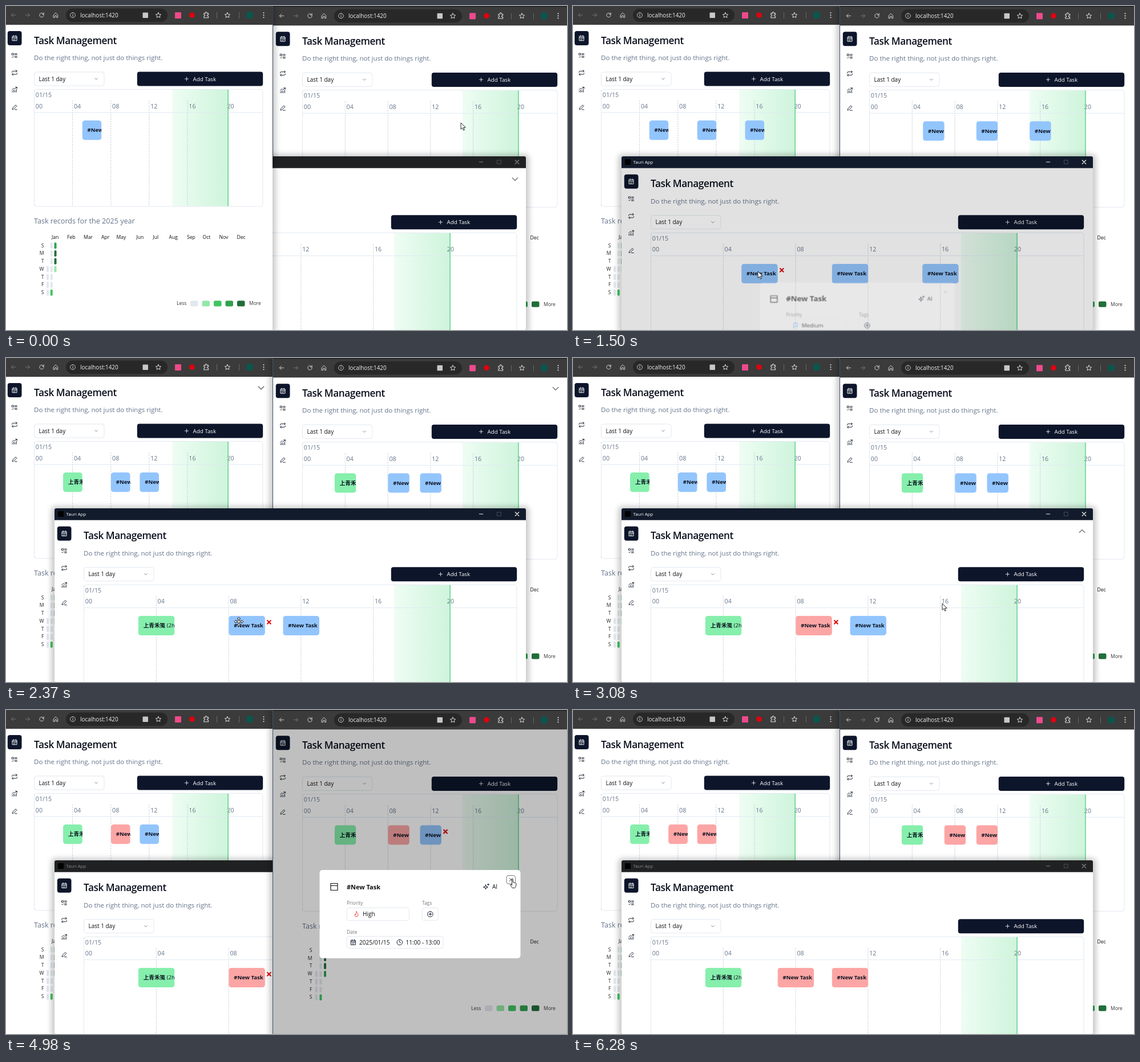
These frames come from a looping animation (983x569 px, 6300 ms). An HTML page:

```html
<!DOCTYPE html>
<html lang="en">
<head>
<meta charset="utf-8">
<title>Task Management</title>
<style>
html, body { margin: 0; width: 100%; height: 100%; overflow: hidden; background: #fff; }
#stage { display: block; width: 100vw; height: 100vh; font-family: "Open Sans", "Noto Sans", "Noto Sans CJK SC", "Noto Sans CJK", sans-serif; }
text { white-space: pre; }
.shadow { filter: blur(5px); }
</style>
</head>
<body>
<svg id="stage" viewBox="0 0 983 569" preserveAspectRatio="none">
  <defs>
    <linearGradient id="past">
      <stop offset="0" stop-color="#86efac" stop-opacity=".14"/>
      <stop offset=".45" stop-color="#86e8a8" stop-opacity=".26"/>
      <stop offset="1" stop-color="#86e3a6" stop-opacity=".4"/>
    </linearGradient>
  </defs>
</svg>
<script>
const LOOP = 6300;
const INK = '#0c152a', MUTED = '#64748b', BORDER = '#e2e8f0';
const stage = document.getElementById('stage');

const ICONS = {
  back: 'M20 12H4M11 5l-7 7 7 7',
  forward: 'M4 12h16M13 5l7 7-7 7',
  reload: 'M20 12a8 8 0 1 1-2.4-5.7L20 9M20 3v6h-6',
  home: 'M4 11l8-8 8 8v10h-5v-7H9v7H4z',
  info: 'M12 2a10 10 0 1 1 0 20a10 10 0 1 1 0-20M12 11v6M12 7v1',
  star: 'M12 3l2.8 6 6.5.8-4.8 4.4 1.3 6.4L12 17.4l-5.8 3.2 1.3-6.4L2.7 9.8l6.5-.8z',
  puzzle: 'M4 6h5V4a2 2 0 0 1 5 0v2h5v5h-2a2 2 0 0 0 0 5h2v5H4v-5h1a2 2 0 0 0 0-5H4z',
  calendar: 'M4 5h16v16H4zM4 10h16M8 2v4M16 2v4M8 14h1M12 14h1M16 14h1M8 18h1M12 18h1',
  list: 'M3 4h6v6H3zM13 5h8M13 9h8M3 17l2 2 4-4M13 15h8M13 19h8',
  repeat: 'M17 2l4 4-4 4M3 11V9a3 3 0 0 1 3-3h15M7 22l-4-4 4-4M21 13v2a3 3 0 0 1-3 3H3',
  chart: 'M4 20v-5M9 20v-8M14 20v-6M19 20V10M3 11l6-6 4 4 8-7M15 2h6v5',
  pen: 'M4 20l1-5L16 4l4 4L9 19zM13 21h8',
  down: 'M6 9l6 6 6-6',
  up: 'M6 15l6-6 6 6',
  plus: 'M12 4v16M4 12h16',
  cross: 'M6 6l12 12M18 6L6 18',
  minus: 'M5 12h14',
  box: 'M5 5h14v14H5z',
  panel: 'M3 3h18v18H3zM3 9h18',
  spark: 'M10 6l2 6 6 2-6 2-2 6-2-6-6-2 6-2zM19 2v6M16 5h6',
  addRound: 'M12 2a10 10 0 1 1 0 20a10 10 0 1 1 0-20M12 7v10M7 12h10',
  clock: 'M12 2a10 10 0 1 1 0 20a10 10 0 1 1 0-20M12 6v6l4 2',
  flame: 'M12 2c1 5 6 7 6 13a6 6 0 0 1-12 0c0-2 1-3 2-4 0 2 1 3 2 3 2-2 0-6 2-12',
  flag: 'M5 22V3h14v15l-7-4-7 4'
};

const icon = (name, x, y, size, color = INK, weight = 2) =>
  `<path d="${ICONS[name]}" transform="translate(${x - size / 2} ${y - size / 2}) scale(${size / 24})" fill="none" stroke="${color}" stroke-width="${weight}" stroke-linecap="round" stroke-linejoin="round"/>`;
const rect = (x, y, w, h, fill, r = 0, more = '') =>
  `<rect x="${x}" y="${y}" width="${w}" height="${h}" rx="${r}" fill="${fill}" ${more}/>`;
const frame = (x, y, w, h, r = 4, fill = 'none') => rect(x, y, w, h, fill, r, `stroke="${BORDER}"`);
const text = (s, x, y, size, color = '#111', weight = 400, more = '') =>
  `<text x="${x}" y="${y}" font-size="${size}" fill="${color}" font-weight="${weight}" ${more}>${s}</text>`;
const line = (x1, y1, x2, y2, color, more = '') =>
  `<path d="M${x1} ${y1}L${x2} ${y2}" stroke="${color}" fill="none" ${more}/>`;
const dot = (x, y, r, fill) => `<circle cx="${x}" cy="${y}" r="${r}" fill="${fill}"/>`;

// Each page shares one layout; "extra" is the added content width.
const WINS = {
  L: { x: 0, y: 0, w: 467, h: 569, dx: 0, dy: 0, extra: 0, zoom: 1, modal: [233, 357] },
  R: { x: 467.5, y: 0, w: 515.5, h: 569, dx: 470, dy: 1.3, extra: 46, zoom: 1.13, modal: [725.5, 358.5] },
  T: { x: 85, y: 264, w: 826, h: 305, dx: 87, dy: 251.7, extra: 358, zoom: 1, modal: [498, 561] }
};
const hourWidth = win => (402.8 + win.extra) / 24;

function browserBar(win) {
  const e = win.extra, c = '#dedede', dim = '#7b7b7b';
  return rect(-3, -2, 480 + e, 35, '#3b3b3b') + (e ? rect(-3, -2, 480 + e, 2, '#1d1d1d') : '') +
    icon('back', 13, 16, 11, e ? c : dim) + icon('forward', 38, 16, 11, dim) +
    icon('reload', 62.5, 16, 11, c) + icon('home', 87, 16, 11, c) +
    rect(105, 4.5, 178 + e, 23.5, '#282828', 11.7) +
    icon('info', 117, 16, 10.5, c) + text('localhost:1420', 130, 19.8, 9.9, '#f0f0f0') +
    `<g transform="translate(${e} 0)">` +
    rect(239.5, 11.5, 9.5, 9.5, '#c8c8c8', 1) + icon('star', 267, 16, 12, c) +
    rect(296, 11, 11, 11, '#ee4a8b', 1) + dot(326, 16, 4.8, '#e2000f') +
    icon('puzzle', 351, 16, 12.5, c) + line(369.5, 11, 369.5, 22, '#666') +
    icon('star', 388, 16, 12, c) + line(408.5, 11, 408.5, 22, '#666') +
    dot(427, 16, 6.6, '#0d554c') + [12, 16, 20].map(y => dot(451.5, y, 1.1, c)).join('') + '</g>';
}

function timeline(win) {
  const hw = hourWidth(win), now = 49.5 + 20.24 * hw;
  let s = rect(now - 98, 147, 98, 204.5, 'url(#past)');
  for (let h = 0; h < 24; h += 4) {
    const x = 49.5 + h * hw;
    if (h < 20) s += line(x, h ? 166 : 148, x, 351, '#c3cad4', 'stroke-dasharray="2.2 1.8"');
    s += text(String(h).padStart(2, '0'), x + 2.3, 179.8, 10.7, MUTED);
  }
  return s + frame(49.5, 146.5, 400.5 + win.extra, 205.5) +
    line(50, 187, 450 + win.extra, 187, '#dfe9f4') + text('01/15', 51.8, 160, 10.7, MUTED) +
    line(now, 147, now, 351.5, '#5ed28a', 'stroke-width="1.5"');
}

const GREENS = ['#e2e8f0', '#93e8a8', '#40c463', '#30a14e', '#216e39'];
const MONTHS = 'Jan Feb Mar Apr May Jun Jul Aug Sep Oct Nov Dec'.split(' ');
const MONTH_X = [0, 27, 56, 87, 113.5, 148.5, 177.5, 205.5, 237, 264.5, 293.5, 324.5];
// Rows are weekdays, digits are levels per week.
const WEEKS = ['-03', '-04', '-04', '00', '00', '00', '02'];

const cell = (win, col, row, level) =>
  rect(65 + win.zoom * (6 + 6.75 * col), 415.6 + 13.75 * row, 4, 10.6, GREENS[level], 1.4);

function records(win) {
  let s = text('Task records for the 2025 year', 49, 382.3, 12.6, MUTED);
  MONTHS.forEach((m, i) => s += text(m, 66.5 + 13.5 * win.zoom + MONTH_X[i] * win.zoom, 409, 8.6));
  WEEKS.forEach((row, r) => {
    s += text('SMTWTFS'[r], 66.5, 423.5 + 13.75 * r, 8.6, '#222', 400, 'text-anchor="end"');
    [...row].forEach((v, c) => { if (v !== '-') s += cell(win, c, r, v); });
  });
  s += `<g transform="translate(${win.extra} 0)">` + text('Less', 299, 525.3, 8.5, '#333');
  GREENS.forEach((g, i) => s += rect(323 + 20.5 * i, 517.5, 13.5, 10, g, 2.5));
  return s + text('More', 426, 525.3, 8.5, '#333') + '</g>';
}

function page(win) {
  const e = win.extra;
  let s = rect(2.8, 44, 24.7, 25, INK, 4) + icon('calendar', 15.2, 56.5, 11.5, '#fff');
  ['list', 'repeat', 'chart', 'pen'].forEach((n, i) => s += icon(n, 15, 87 + 30.2 * i, 11.5, '#1a2233'));
  s += text('Task Management', 49, 66.5, 17.2, '#0a0f1c', 600, 'letter-spacing="-.43"') +
    text('Do the right thing, not just do things right.', 49, 95, 11.55, MUTED) +
    frame(49.5, 116, 122.5, 24, 4) + text('Last 1 day', 57.5, 131.5, 10) + icon('down', 158, 128, 10, '#777') +
    rect(229.8 + e, 115.6, 220.4, 25, INK, 4) + icon('plus', 316.5 + e, 128, 9.5, '#fff') +
    text('Add Task', 327.5 + e, 131.5, 9.8, '#fff', 500);
  return s + timeline(win);
}

function titleBar(win, focused) {
  const c = focused ? '#fff' : '#8a8a8a';
  return rect(win.x, win.y, win.w, 20.7, focused ? '#121b2b' : '#202122') + rect(91, 269, 10, 10, '#000') +
    text('Tauri App', 105.5, 277, 7.9, c) + icon('minus', 832.5, 274, 11, c) +
    icon('box', 864, 274, 11, '#4d535d') + icon('cross', 895.5, 274, 13, c);
}

const FILL = { b: '#93c5fd', g: '#86efac', r: '#fca5a5' };
function tasks(win, list) {
  const hw = hourWidth(win);
  return list.split(' ').filter(Boolean).map(item => {
    const [, start, kind, hot] = item.match(/(\d+)(\w)(x?)/);
    const x = 49.6 + start * hw, w = 2 * hw + .3;
    const label = kind === 'g' ? '上青禾笺<tspan font-weight="400"> (2h)</tspan>' : '#New Task';
    return `<svg x="${x}" y="201" width="${w}" height="34.5">` + rect(0, 0, w, 34.5, FILL[kind], 5) +
      text(label, 9, 20.3, 9.6, '#0b1220', 700) + '</svg>' +
      (hot ? icon('cross', x + w + 7, 212.2, 11.5, '#dc1414', 4.5) : '');
  }).join('');
}

function modal(win, [, show, level, title, size, hours]) {
  const [cx, cy] = win.modal, k = .925 + .075 * show;
  const [mark, tone] = { High: ['flame', '#ef4444'], Medium: ['flag', '#60a5fa'], Low: ['flag', '#4ade80'] }[level];
  const top = win === WINS.T ? 284.7 : 34.5;
  return rect(win.x, top, win.w, 569 - top, '#000', 0, `opacity="${.25 * show ** 1.45}"`) +
    `<g transform="translate(${cx} ${cy}) scale(${k}) translate(-176 -77.5)">` +
    rect(0, 0, 352, 155, '#fff', 5, `opacity="${show ** 3}"`) + `<g opacity="${show}">` +
    icon('panel', 25.5, 29.5, 16, '#111', 1.8) + text(title, 47.5, 33.5, size, '#111', 700) +
    icon('spark', 292, 29, 12) + text('AI', 302.5, 32.7, 10) +
    (show < 1 ? icon('cross', 335.2, 17, 8, '#999') :
      rect(327.5, 9.5, 15.5, 15, '#fff', 4, 'stroke="#777"') + icon('cross', 335.2, 17, 11, '#333')) +
    text('Priority', 47.5, 61, 8.4, '#777') + frame(47.5, 66.5, 109.5, 22, 4) +
    icon(mark, 64.5, 77.5, 11.5, tone) + text(level, 75.5, 81, 10.1) +
    text('Tags', 179.5, 61, 8.4, '#777') + frame(179.5, 66.5, 28.5, 22, 4) + icon('addRound', 193.8, 77.5, 11.5) +
    text('Date', 47.5, 112, 8.4, '#777') + frame(47.5, 116.5, 169, 21, 4) + icon('calendar', 59, 127, 11.5) +
    text('2025/01/15', 69.5, 130.5, 10.1) + icon('clock', 140.3, 127, 11.5) + text(hours, 151, 130.5, 10.1) + '</g></g>';
}

const POINTERS = {
  a: 'M0 0v11.5l2.7-2.5 1.9 4.3 1.8-.8-1.9-4.2h3.7z',
  h: 'M-2.5-6.5q1-1 2 0v5l4.5 1.2q1.2.5 1 2l-.7 3.8q-.3 2.5-2 3h-4q-1.5-1.5-3.5-5.2 0-1.8 2.7.2z',
  m: 'M0-8l2.7 3h-1.7v4h4v-1.7l3 2.7-3 2.7v-1.7h-4v4h1.7l-2.7 3-2.7-3h1.7v-4h-4v1.7l-3-2.7 3-2.7v1.7h4v-4h-1.7z'
};
function pointer(spec) {
  if (!spec) return '';
  const [kind, x, y] = spec.split(' ');
  return `<path d="${POINTERS[kind]}" transform="translate(${x} ${y})" fill="#fff" stroke="#111" stroke-width=".9" stroke-linejoin="round"/>`;
}

// t time, z stacking (bottom first), L/R/T tasks, v chevrons, f focus, h today's level, m dialog, c pointer
const FIRST = '#New Task', BIG = 13.6, SMALL = 11;
const early = '05:00 - 07:00', mid = '08:00 - 10:00', late = '11:00 - 13:00';
const trio = '5b 10b 15b', sorted = '3g 8b 11b', oneHigh = '3g 8r 11b', twoHigh = '3g 8r 11r', moved = '3g 7r 10r';
const STEPS = [
  { t: 0, z: 'RTL', L: '5b', R: '', T: '', v: 'Td', f: 0, h: 1, m: 0, c: 'a 797 205' },
  { t: 120, z: 'LTR', v: '', c: 'a 760 214' },
  { t: 270, R: '5b', v: 'Rd', c: 'a 728 216' },
  { t: 420, R: '5b 10b' },
  { t: 550, L: '5b 10b', v: '', c: 'a 712 330' },
  { t: 690, c: 'a 640 540' },
  { t: 840, z: 'LRT', f: 1, T: '5b 10b', c: 'a 640 500' },
  { t: 980, T: trio, c: 'a 620 468' },
  { t: 1130, L: trio, R: trio, c: 'a 470 470' },
  { t: 1250, T: '5bx 10b 15b', c: 'a 332 468' },
  { t: 1380, c: 'a 324 466' },
  { t: 1500, m: ['T', .6, 'Medium', FIRST, BIG, early] },
  { t: 1650, m: ['T', 1, 'Medium', FIRST, BIG, early], c: 'a 400 520' },
  { t: 1800, m: ['T', 1, 'Low', '上青禾笺', BIG, early], c: 'h 420 560' },
  { t: 1920, m: ['T', .6, 'Low', '上青禾笺', BIG, early], c: 'h 657 501' },
  { t: 2070, m: 0, T: '3gx 10b 15b', c: 'm 265 466' },
  { t: 2220, T: '3g 10b 11bx', c: 'm 515 466' },
  { t: 2370, L: sorted, R: sorted, T: '3g 8bx 11b', v: 'LdRd', c: 'm 408 463' },
  { t: 2520, v: '', c: 'a 418 468' },
  { t: 2670, m: ['T', .6, 'Medium', FIRST, SMALL, mid] },
  { t: 2790, m: ['T', 1, 'Medium', FIRST, SMALL, mid], c: 'h 420 560' },
  { t: 2930, m: ['T', 1, 'High', FIRST, SMALL, mid], c: 'h 657 501' },
  { t: 3080, m: 0, T: '3g 8rx 11b', v: 'Tu', c: 'a 647 431' },
  { t: 3200, v: '', c: 'a 690 350' },
  { t: 3350, c: 'a 705 285' },
  { t: 3470, z: 'LTR', f: 0, h: 3, c: 'a 690 230' },
  { t: 3620, v: 'Rd', c: 'a 668 195' },
  { t: 3740, L: oneHigh, R: oneHigh, c: 'a 654 176' },
  { t: 3860, c: 'a 648 169' },
  { t: 4010, v: '', c: 'a 700 205' },
  { t: 4130, R: '3g 8r 11bx', c: 'a 745 217' },
  { t: 4550, m: ['R', .6, 'Medium', FIRST, SMALL, late] },
  { t: 4700, m: ['R', 1, 'Medium', FIRST, SMALL, late], c: 'h 655 360' },
  { t: 4830, m: ['R', 1, 'High', FIRST, SMALL, late], c: 'h 770 335' },
  { t: 4980, c: 'h 889 304' },
  { t: 5130, m: ['R', .6, 'High', FIRST, SMALL, late] },
  { t: 5280, m: 0, R: twoHigh, c: 'a 860 340' },
  { t: 5400, L: twoHigh, v: 'Rd', c: 'a 680 540' },
  { t: 5550, z: 'LRT', f: 1, T: twoHigh, v: '', c: 'a 470 510' },
  { t: 5700, T: '3g 8rx 11r', c: 'm 420 468' },
  { t: 5850, T: '3g 7rx 11r', c: 'm 388 468' },
  { t: 6000, T: '3g 7r 11rx', c: 'm 516 468' },
  { t: 6130, T: '3g 7r 10rx', c: 'm 485 468' },
  { t: 6280, L: moved, R: moved, T: moved, f: 0, c: '' }
];
STEPS.forEach((s, i) => STEPS[i] = { ...STEPS[i - 1], ...s });

function group(parent, html = '') {
  const g = document.createElementNS('http://www.w3.org/2000/svg', 'g');
  g.innerHTML = html;
  return parent.appendChild(g);
}

for (const [key, win] of Object.entries(WINS)) {
  const clip = `clip${key}`;
  const native = key === 'T';
  win.root = group(stage, `<clipPath id="${clip}">${rect(win.x, win.y, win.w, win.h, '#000', native ? 3 : 0)}</clipPath>` +
    rect(win.x - 6, win.y - 4, win.w + 12, win.h + 10, '#000', 8, 'class="shadow" opacity=".2"'));
  const body = group(win.root, rect(win.x, win.y, win.w, win.h, '#fff'));
  body.setAttribute('clip-path', `url(#${clip})`);
  const local = group(body, native ? page(win) : browserBar(win) + page(win) + records(win));
  local.setAttribute('transform', `translate(${win.dx} ${win.dy})`);
  win.live = group(local);
  win.cover = group(body);
  if (key === 'R') group(win.root, line(467.5, 0, 467.5, 569, '#40516b'));
}
const cursor = group(stage);

function show(s) {
  for (const key of s.z) {
    const win = WINS[key];
    stage.insertBefore(win.root, cursor);
    const way = s.v.split(key)[1];
    win.live.innerHTML = tasks(win, s[key]) + (key === 'T' ? '' : cell(win, 2, 3, s.h)) +
      (way ? icon(way[0] === 'd' ? 'down' : 'up', 447 + win.extra, 52.5, 19, '#777', 1.8) : '');
    win.cover.innerHTML = (s.m && s.m[0] === key ? modal(win, s.m) : '') + (key === 'T' ? titleBar(win, s.f) : '');
  }
  cursor.innerHTML = pointer(s.c);
}

const began = performance.now();
let current;
function tick() {
  const t = (performance.now() - began) % LOOP;
  const step = STEPS.findLast(s => s.t <= t);
  if (step !== current) show(current = step);
  requestAnimationFrame(tick);
}
tick();
</script>
</body>
</html>
```
